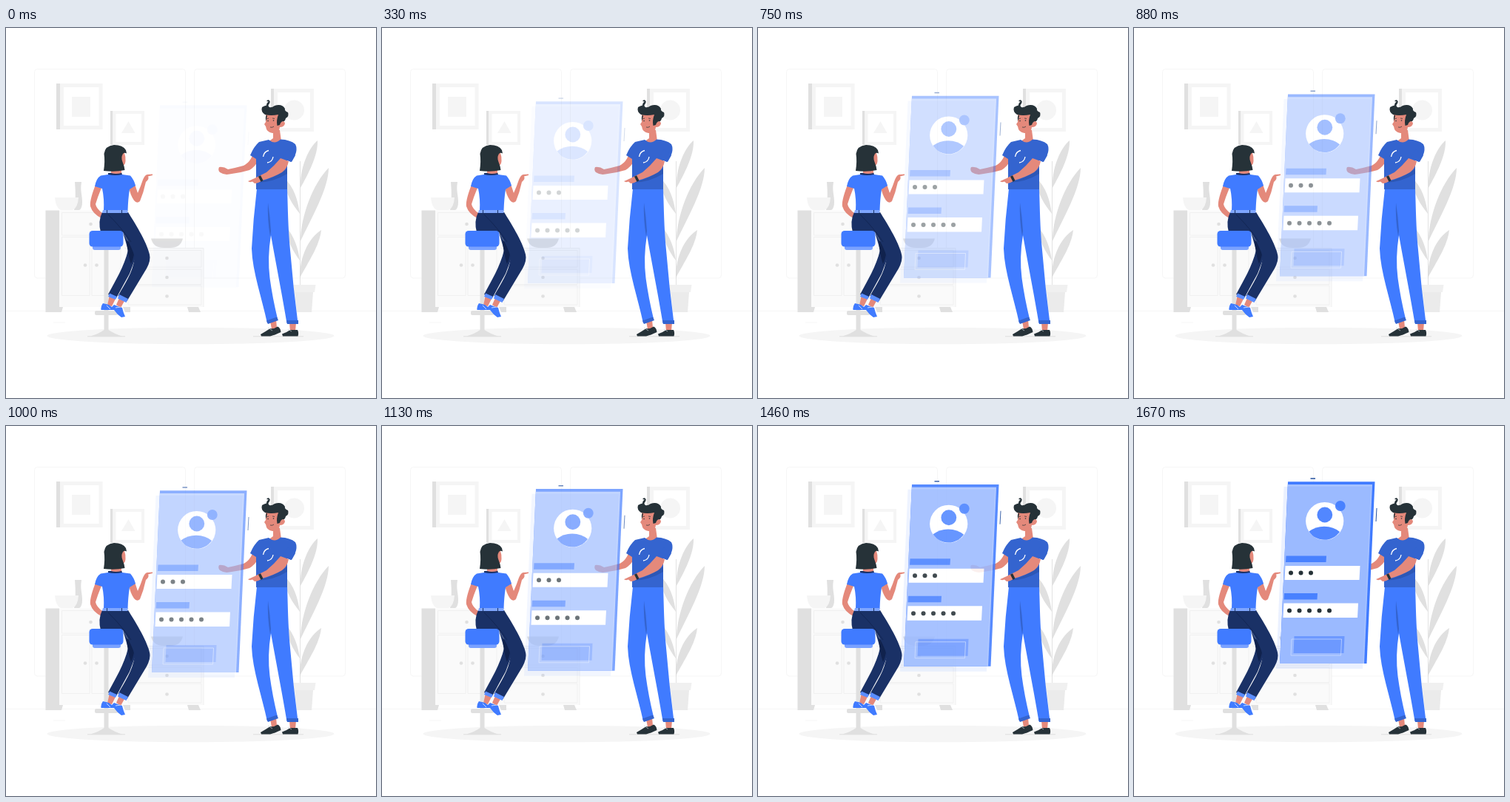
An HTML page for the animation above (1.71 s loop, 500x500 px).

```html
<!DOCTYPE html>
<html lang="en">
<head>
<meta charset="utf-8">
<title>Sign-in panel</title>
<style>
  html, body { margin: 0; height: 100%; overflow: hidden; background: #fff; }
  svg { display: block; width: 100vw; height: 100vh; }
  .blue { fill: #407bff; }
  .shirt { fill: #3464cf; }
  .navy { fill: #1a3166; }
  .skin { fill: #e4897b; }
  .dark { fill: #263238; }
  .g1 { fill: #e0e0e0; }
  .g2 { fill: #f0f0f0; }
  .g3 { fill: #f5f5f5; }
  .white { fill: #fff; }
  .line { fill: none; stroke: #f0f0f0; }
  .thin { fill: none; stroke-width: .7; }
</style>
</head>
<body>
<svg viewBox="0 0 500 500">
  <!-- room -->
  <g class="line" stroke-width=".7" style="stroke:#f3f3f3">
    <rect x="38.5" y="55.5" width="204" height="282.5" rx="4"/>
    <rect x="254.5" y="55.5" width="204" height="282.5" rx="4"/>
    <path d="M0 382.5H500M64 398H80"/>
  </g>
  <g id="pictures"></g>
  <rect class="g3" x="89" y="93" width="25" height="27"/>
  <path class="g3" d="M165.500 126L156 142H174.500Z"/>
  <circle class="g3" cx="389.5" cy="111" r="13.5"/>

  <!-- cabinets -->
  <path fill="#fafafa" d="M72 246.500H167V377H72ZM160 297.500H267V377H160Z"/>
  <path class="g1" d="M53.500 246.500H72V377H77L75 384H53.500ZM158 377H168V384H161ZM245 377H260L263 384H247Z"/>
  <path class="line" d="M75.500 249.500H155V280H75.500ZM75.500 282.500H113V361.500H75.500ZM116 282.500H155V361.500H116ZM160 297.500H267V377M165 300.500H264V323H165ZM165 326H264V346.500H165ZM165 348H264V374H165Z"/>
  <g class="g1" id="knobs"></g>
  <path class="g1" d="M93 208H102C100 220 103 226 103 235Q103 244 99 246H92Q95 230 93 208Z"/>
  <path class="g3" d="M66 229H98Q97 243 90 246H74Q67 243 66 229Z"/>
  <path class="g1" d="M196 284.500H239Q236 297 222 297H213Q199 297 196 284.500Z"/>

  <!-- plant -->
  <path class="g1" d="M398 216C397 190 408 163 421 152C422 172 408 198 398 216ZM398 288C398 255 415 210 436 189C436 217 413 256 398 288ZM397 338C397 308 409 284 426 273C424 294 408 317 397 338ZM397 251C395 234 389 214 376 203C377 224 387 238 397 251ZM397 314C395 297 389 281 378 268C380 288 388 302 397 314Z"/>
  <path class="thin" stroke="#d6d6d6" d="M397.500 180V347"/>
  <path fill="#ebebeb" d="M390 357H415L413 384H393Z"/>
  <path class="g2" d="M386 347H418.500L417 357H388Z"/>
  <ellipse class="g3" cx="249.5" cy="416" rx="194" ry="11.3"/>

  <!-- far arm -->
  <path class="skin" d="M334 170C331 178 327 183 321 186Q310 189 300 191Q294 187 288 188Q286 192 289 195Q295 199 302 197.500Q316 196 329 192Q336 188 342 178Z"/>

  <g id="panel">
    <path class="blue" d="M208 75.300H325.500L314.500 321H197Z"/>
    <path fill="#a6c2ff" d="M207.800 79H322L311 321H197Z"/>
    <path class="blue" opacity=".1" d="M202.500 82H320L309 328H192Z"/>
    <path fill="#24509f" d="M238.500 70.300H245V71.700H238.500ZM327.500 111H328.500L327.500 129H326.500Z"/>
    <circle class="white" cx="257.7" cy="128.5" r="25.6"/>
    <g class="blue" opacity=".9">
      <circle cx="257.8" cy="120" r="10.4"/>
      <path d="M236.500 142.500Q245 136 257 135.700Q270 136 278 143A25 25 0 0 1 236.500 142.500Z"/>
      <circle cx="278.8" cy="108" r="6.9"/>
      <path d="M205.500 175.500H260L259.500 184H205ZM203 226H248L247.500 234.500H202.500Z"/>
    </g>
    <path class="white" d="M204.500 189H305.500L304.500 208H203.500ZM202.500 239.500H303L302 259H201.500Z"/>
    <g class="dark" id="dots"></g>
    <path class="blue" opacity=".5" d="M216.500 284H284.500L283.500 307H215.500Z"/>
    <path class="thin" stroke="#cfdeff" d="M213 288H280.500L279.500 310H212Z"/>
  </g>

  <!-- stool -->
  <path class="g1" d="M132.500 299H138.500V408Q146 413 157 416.500H114Q126 413 132.500 408Z"/>
  <rect class="g1" x="120" y="382" width="31" height="6" rx="2"/>
  <path class="thin" stroke="#d6d6d6" d="M110 416.800H161M334 416.800H402"/>

  <!-- woman -->
  <path class="skin" d="M121 212C117 222 113 234 114 241Q117 251 129 257L131 251Q122 244 121 238Q124 228 129 216ZM174 211L178 223Q182 214 185 205Q188 198 191 198L198 197.500V199L192 200.500Q194 204 189 208Q186 222 181 234Q177 238 173 233Q168 226 166 215ZM140 360L137 375L143 376L149 364ZM153 365L149 374L155 378L160 369Z"/>
  <path class="blue" d="M131 372L139 374L143 377L146 374L151 376L157 378Q158 383 161 390L156 391Q150 387 146 381H128.500Q128 376 131 372Z"/>
  <path class="thin" stroke="#fff" d="M136 375L141 380M148 378L155 377"/>
  <path class="navy" d="M158 276L165 300C160 322 147 343 138 360L149 365Q158 348 167 332L176 308Z"/>
  <path fill="#10224d" d="M163 287L174 293Q174 308 169 319Q164 305 163 287Z"/>
  <path class="navy" d="M130 249H165C173 262 190 288 194 306Q196 314 190 325L163.500 369L151.500 362C160 346 171 332 174 310Q171 297 158 276H128Q124 261 130 249Z"/>
  <path class="thin" stroke="#10224d" d="M138 252Q158 272 169 289"/>
  <path class="blue" style="fill:#5a8dff" d="M140 358.500L150 363L148 367L138 363ZM153 360L165 366L162.500 371L151 365.500Z"/>
  <path class="blue" d="M138 198Q147 196 157 198L168 199.500Q173 205 175 213L167 218Q165 231 164.500 247H132Q133 231 130 217L120 214Q122 203 128 199.500Z"/>
  <path fill="#7fa6ff" d="M131 246H164.500V250H130Z"/>
  <path class="navy" d="M136 246H137V250H136ZM156 246H157V250H156ZM138 196L156 195L157 198Q147 200 138 198Z"/>
  <path class="skin" d="M142 188H156V196Q148 198 142 196ZM155 169H160Q162 174 161.500 180Q161 186 156 187Z"/>
  <path class="dark" d="M132 193Q134 180 132.500 170Q134 159 146 158Q158 158 162 165L163 169.500Q160 168 158 170Q155 175 157.500 181Q160 187 160.500 192Q147 195 132 193Z"/>
  <rect x="117" y="290" width="38" height="10" rx="3" fill="#7aa2ff"/>
  <rect class="blue" x="112.5" y="274" width="46" height="21.5" rx="4.5"/>

  <!-- man -->
  <path class="skin" d="M357 396L359 407L366 405L365 394ZM383 398L384 410H391L392 398Z"/>
  <path class="dark" d="M344 414Q351 410 357 406Q362 407 367 403.500Q371 405 371.500 411Q363 415 357 416.500H345ZM373 413.500Q380 411 384 408H394Q396 412 394.500 416.500H374Z"/>
  <path class="thin" stroke="#c9d3d8" d="M354 405L360 409M381 407L386 410"/>
  <path class="blue" d="M339 217H380C381 245 381 268 384 300Q388 350 394.500 399H379.500C374 365 366 325 358 280Q353 310 356.500 338Q360 364 367 393L353 399C346 365 333 330 332 298Q334 258 339 217Z"/>
  <path class="shirt" d="M354 236Q353 258 357 282L358 274Q357 256 354 236ZM352 395.500L366 390.500L368 395L354 400ZM379 395H395V400H380Z"/>
  <path class="skin" d="M361 138H370L372 153Q363 161 354 154L361 149Z"/>
  <path class="shirt" d="M355 151Q363 158 371 150.500Q384 151 391 157Q396 167 385 181L380 179V218H338L338 177L330 172Q335 160 342 154Z"/>
  <path fill="#2c57b6" d="M340 209Q364 202 380 190V197Q362 208 340 209Z"/>
  <path class="skin" d="M371 176Q362 187 352 195L340 201Q332 205 327 207Q329 209 333 207.500L336 210Q341 210 346 206Q361 202 373 195Q380 190 382 180Z"/>
  <path class="shirt" d="M374 175L386 181L391 172L381 164Z"/>
  <path d="M342.500 200L346 207" stroke="#263238" stroke-width="3.5"/>
  <path d="M347.500 174Q348.500 167 355 165.500M353 182Q360 181 361 174" fill="none" stroke="#fff" stroke-width="1.3"/>
  <path class="skin" d="M351 117L369 115L371 127Q376 124 377 129Q376 134 370 134Q369 143 360 142Q352 141 351 133L349 130L351 127Z"/>
  <path class="dark" d="M354 97Q358 98 356 102Q353 105 356 107Q359 108 363 105Q373 102 377 109Q376 112 381 114Q383 119 378 122Q377 127 374 126Q371 127 370 131L366.500 132Q365 125 368 117Q358 119 350 117Q344 113 346 107Q349 105 352 104.500Q352 101 355 99.500L352 99Z"/>
  <path class="dark" d="M352 117Q350 121 351 126L353 119Z"/>
  <g class="dark"><circle cx="354" cy="125.5" r=".8"/><circle cx="361.5" cy="125" r=".8"/></g>
  <path class="thin" stroke="#263238" d="M352 123L355 122M360 122L363 122.500M357 134Q360 135 362 133"/>
</svg>
<script>
  const $ = id => document.getElementById(id);
  const rect = (cls, x, y, r, b) =>
    `<rect class="${cls}" x="${x}" y="${y}" width="${r - x}" height="${b - y}"/>`;
  const dots = (points, radius) =>
    points.map(([x, y]) => `<circle cx="${x}" cy="${y}" r="${radius}"/>`).join('');
  const picture = (x, y, r, b, side, border) =>
    rect('g1', x, y, x + side, b) + rect('g3', x + side, y, r, b) +
    rect('white', x + side + border, y + border, r - border, b - border);

  $('pictures').innerHTML = picture(68, 75, 130.5, 137, 5, 5) +
    picture(141, 112, 187, 158, 3.5, 4) + picture(358, 82, 416, 140, 4, 5);
  $('knobs').innerHTML = dots([[114.5, 265], [107, 320.5], [122.5, 320.5],
    [217.5, 311], [217.5, 337], [217.5, 362.5]], 2.3);
  const row = (count, x, y) => Array.from({ length: count }, (_, i) => [x + i * 13.5, y]);
  $('dots').innerHTML = dots([...row(3, 212, 198.5), ...row(5, 210, 249.5)], 3);

  // The panel rises 30px while fading in, stepped at 24 fps.
  const LOOP = 1710, STEPS = 40, RISE = 30;
  const panel = $('panel');
  function draw(now) {
    const step = Math.floor((now % LOOP + 5) * 0.024);
    const p = Math.min(STEPS, Math.max(1, step)) / STEPS;
    panel.setAttribute('transform', `translate(0 ${RISE * (1 - p)})`);
    panel.setAttribute('opacity', p);
    requestAnimationFrame(draw);
  }
  draw(performance.now());
</script>
</body>
</html>
```
